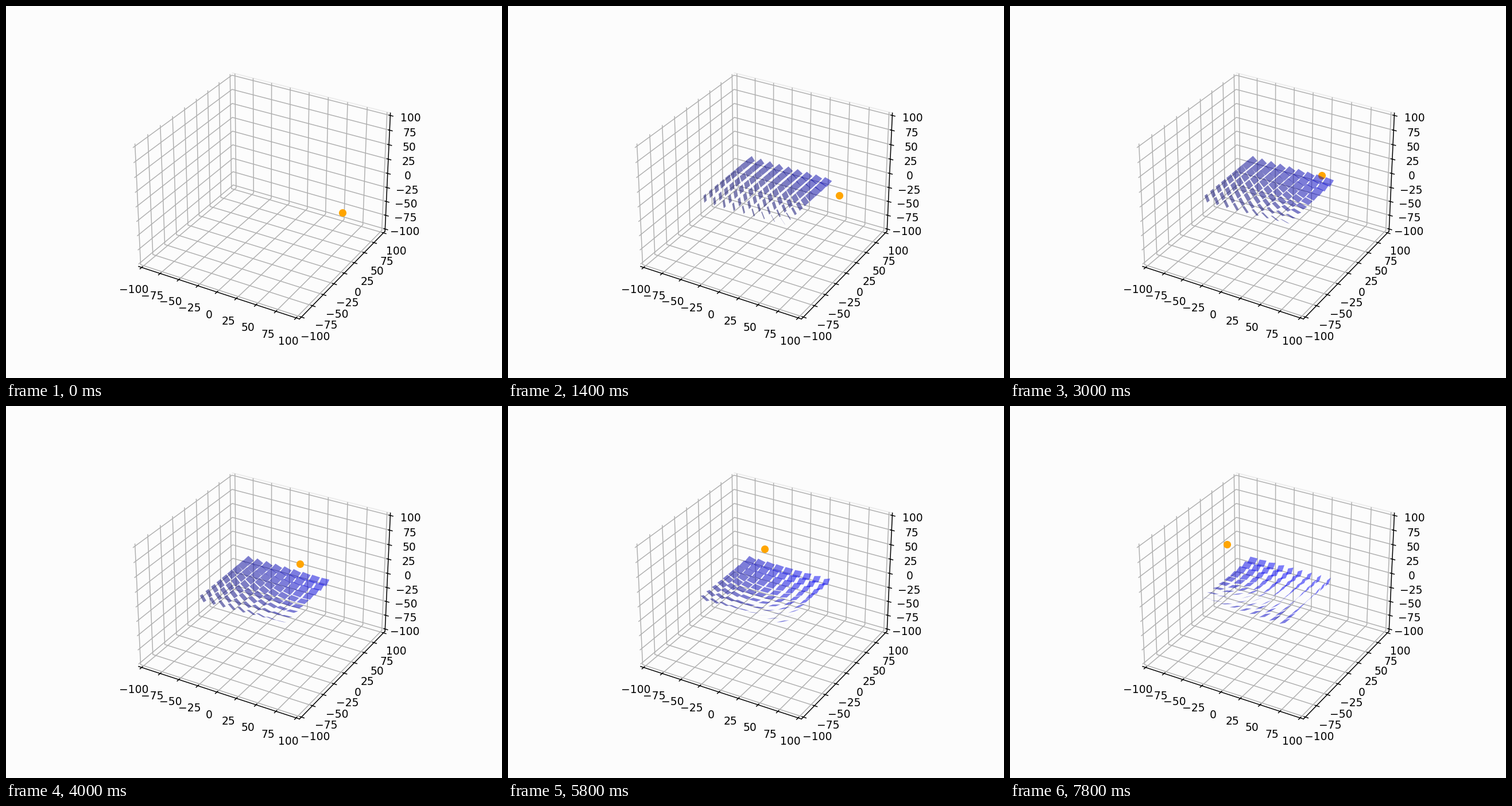
Write a matplotlib script that moves like this. It is 864 by 648 pixels and loops after 8000 ms.

```python
import numpy as np
import matplotlib.pyplot as plt
from matplotlib.animation import FuncAnimation
from mpl_toolkits.mplot3d.art3d import Poly3DCollection

FRAMES, INTERVAL = 40, 200
STEP = np.radians(3.14)        # sun travel per frame
SUN_X, SUN_Z = 100, 70         # half axes of the sun's path
HALF = 5                       # half the side of a panel
PAPER = "#fcfcfc"
LIGHT = np.array([-2, -2, 1]) / 3

gx, gy = np.meshgrid(np.linspace(-50, 50, 9), np.linspace(-50, 50, 9))
centers = np.column_stack([gx.ravel(), gy.ravel(), np.zeros(gx.size)])


def sun_at(i):
    a = i * STEP
    return np.array([SUN_X * np.cos(a), 0.0, SUN_Z * np.sin(a)])


def panels_facing(sun):
    """Corners and shaded colours of all panels turned towards the sun."""
    n = sun - centers
    n /= np.linalg.norm(n, axis=1, keepdims=True)
    nx, ny, nz = n.T
    # shortest rotation that takes the z axis to n
    c = 1 / (1 + nz)
    u = HALF * np.column_stack([1 - nx * nx * c, -nx * ny * c, -nx])
    v = HALF * np.column_stack([-nx * ny * c, 1 - ny * ny * c, -ny])
    quads = np.stack([centers - u - v, centers + u - v,
                      centers + u + v, centers - u + v], axis=1)
    colors = np.zeros((len(n), 4))
    colors[:, 2] = 0.3 + 0.35 * (n @ LIGHT + 1)
    colors[:, 3] = 0.5
    return quads, colors


fig = plt.figure(figsize=(6.4, 4.8), dpi=135, facecolor=PAPER)
ax = fig.add_subplot(projection="3d", computed_zorder=False)
ax.set_facecolor(PAPER)

lim = 100 * 25 / 24
ticks = range(-100, 101, 25)
ax.set(xlim=(-lim, lim), ylim=(-lim, lim), zlim=(-lim, lim),
       xticks=ticks, yticks=ticks, zticks=ticks)
for axis in (ax.xaxis, ax.yaxis, ax.zaxis):
    axis.set_pane_color(PAPER)
ax.yaxis.pane.set_edgecolor("#ececec")

sun_dot, = ax.plot([SUN_X], [0], [0], "o", color="orange", zorder=3)
quads, colors = panels_facing(sun_at(1))
field = Poly3DCollection(quads, facecolors=colors, linewidths=0, zorder=4)
ax.add_collection3d(field)


def draw(i):
    sun = sun_at(i)
    sun_dot.set_data_3d(*sun[:, None])
    field.set_visible(i > 0)
    quads, colors = panels_facing(sun)
    field.set_verts(quads)
    field.set_facecolor(colors)
    return sun_dot, field


anim = FuncAnimation(fig, draw, frames=FRAMES, interval=INTERVAL,
                     init_func=lambda: draw(0), repeat=True)
plt.show()
```
